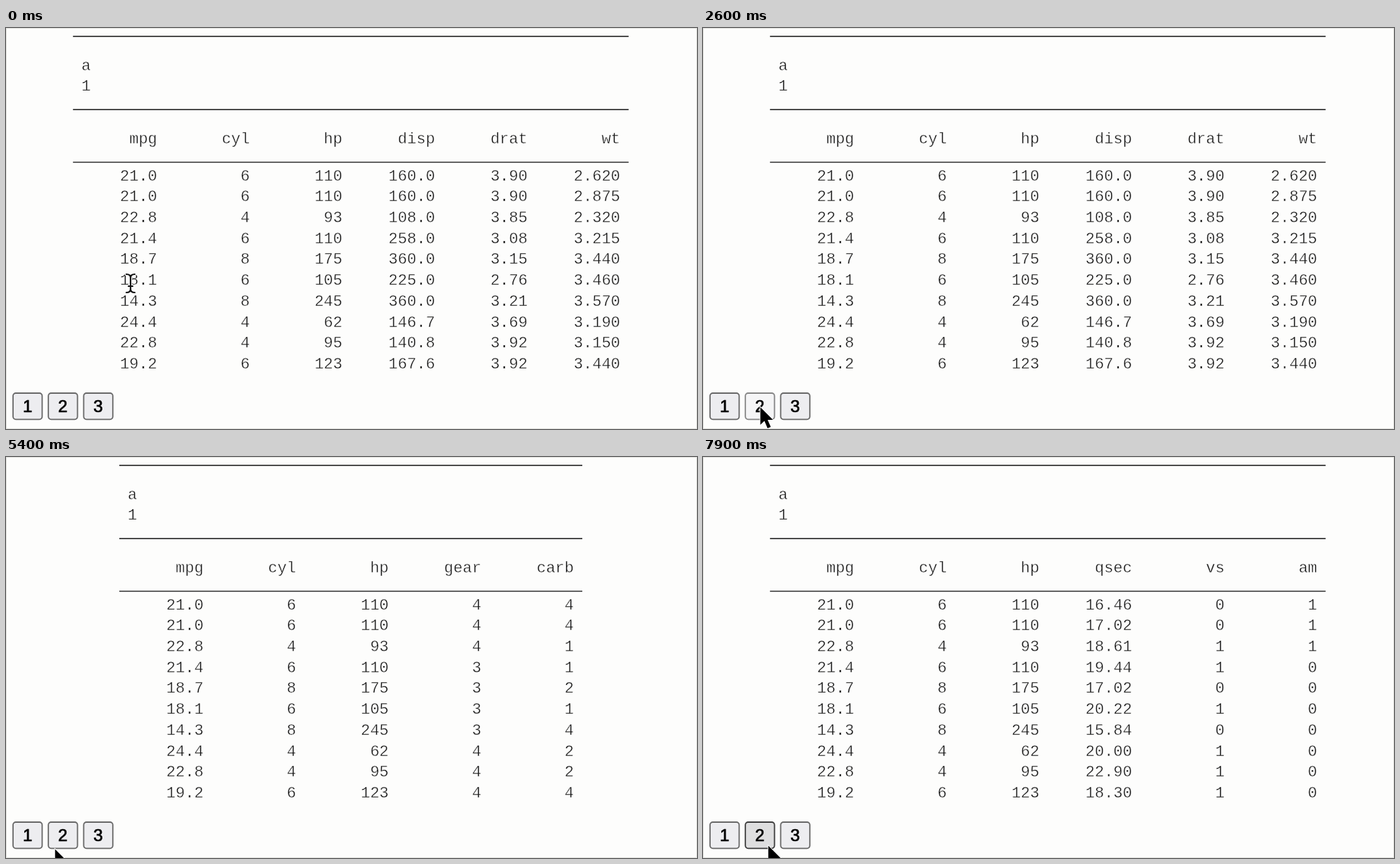
Recreate the animation shown at these times as an HTML page. Size 982x570 px, loop 8000 ms.

```html
<!DOCTYPE html>
<html lang="en">
<head>
<meta charset="utf-8">
<title>Table views</title>
<style>
  html, body { margin: 0; width: 100%; height: 100%; overflow: hidden; background: #fdfdfc; }
  svg { display: block; width: 982px; height: 570px; }
  .cell { font: 22px "Courier New", "Liberation Mono", monospace; fill: #141414; stroke: #fdfdfc; stroke-width: .45; }
  .label { font: 24px Arial, "Liberation Sans", sans-serif; fill: #000; stroke: #000; stroke-width: .7; text-anchor: middle; }
  .rule { stroke: #333; stroke-width: 1.6; }
</style>
</head>
<body>
<svg id="stage" viewBox="0 0 982 570"></svg>
<script>
const LOOP = 8000, STEP = 100;
const COLUMN = 131.6, ROW = 29.73;
const stage = document.getElementById('stage');

// Measured values are text; the classes below follow from them.
const columns = {
  mpg: '21.0 21.0 22.8 21.4 18.7 18.1 14.3 24.4 22.8 19.2',
  hp: '110 110 93 110 175 105 245 62 95 123',
  disp: '160.0 160.0 108.0 258.0 360.0 225.0 360.0 146.7 140.8 167.6',
  drat: '3.90 3.90 3.85 3.08 3.15 2.76 3.21 3.69 3.92 3.92',
  wt: '2.620 2.875 2.320 3.215 3.440 3.460 3.570 3.190 3.150 3.440',
  qsec: '16.46 17.02 18.61 19.44 17.02 20.22 15.84 20.00 22.90 18.30',
  carb: '4 4 1 1 2 1 4 2 2 4'
};
for (const name in columns) columns[name] = columns[name].split(' ');
columns.cyl = columns.hp.map(hp => hp < 100 ? 4 : hp > 150 ? 8 : 6);
columns.vs = columns.qsec.map(qsec => qsec > 18 ? 1 : 0);
columns.am = columns.mpg.map((_, row) => row < 3 ? 1 : 0);
columns.gear = columns.drat.map(drat => drat < 3.5 ? 3 : 4);

const pages = ['disp drat wt', 'qsec vs am', 'gear carb'];

const clicks = [
  { at: 2700, page: 1 }, { at: 4000, page: 2 }, { at: 5800, page: 0 },
  { at: 7400, page: 1 }, { at: 8460, page: 2 }
];
const PRESS = 150, TRAVEL = 600, DIP = 20;

// The pointer leaves the table, then goes from button to button.
const home = { x: 177, y: 363 };
const visits = [
  { at: 750, x: 105, y: 600 },
  ...clicks.map(({ at, page }) => ({ at, x: 34 + 47.5 * page, y: 539 }))
];

function add(parent, tag, attrs, text) {
  const node = document.createElementNS('http://www.w3.org/2000/svg', tag);
  for (const key in attrs) node.setAttribute(key, attrs[key]);
  if (text !== undefined) node.textContent = text;
  parent.append(node);
  return node;
}

function addPage(extra) {
  const names = ['mpg', 'cyl', 'hp', ...extra.split(' ')];
  const group = add(stage, 'g', {});
  const width = names.length * COLUMN;
  const left = 490 - width / 2;
  const write = (x, y, text, anchor) =>
    add(group, 'text', { class: 'cell', x, y, 'text-anchor': anchor }, text);

  for (const y of [11.9, 115.9, 190.7])
    add(group, 'line', { class: 'rule', x1: left, x2: left + width, y1: y, y2: y });
  write(left + 12, 59.5, 'a', 'start');
  write(left + 12, 88.5, '1', 'start');
  names.forEach((name, i) => {
    const right = left + (i + 1) * COLUMN - 12;
    write(right, 163.5, name, 'end');
    columns[name].forEach((value, row) => write(right, 216.5 + row * ROW, value, 'end'));
  });
  return group;
}

function addButton(i) {
  const x = 10 + i * 50.2;
  const box = add(stage, 'rect', { x, y: 519, width: 41.4, height: 37.3, rx: 4, 'stroke-width': 1.8 });
  add(stage, 'text', { class: 'label', x: x + 20.6, y: 545.7 }, i + 1);
  return { x, box };
}

const views = pages.map(addPage);
const buttons = pages.map((_, i) => addButton(i));
add(stage, 'rect', { x: .5, y: .5, width: 981, height: 569, fill: 'none', stroke: '#e2e2de' });

const arrow = add(stage, 'path', {
  d: 'M0 0V25L5.8 19.6L10.3 30L14.8 28L10.4 18H18Z',
  fill: '#000', stroke: '#fff', 'stroke-width': 1.8, 'paint-order': 'stroke'
});
const beam = add(stage, 'g', { fill: 'none', 'stroke-linecap': 'round' });
for (const [stroke, width] of [['#fff', 4.5], ['#111', 2.2]])
  add(beam, 'path', {
    d: 'M-6 -13Q0 -13 0 -8Q0 -13 6 -13M0 -8V8M-6 13Q0 13 0 8Q0 13 6 13M-3 4H3',
    stroke, 'stroke-width': width
  });

// Each trip eases in and out, sagging a little on the way.
function pointerAt(t) {
  let { x, y } = home;
  for (const visit of visits) {
    const u = Math.min(1, (t - visit.at + PRESS + TRAVEL) / TRAVEL);
    if (u <= 0) break;
    const k = u * u * (3 - 2 * u);
    x += (visit.x - x) * k;
    y += (visit.y - y) * k + DIP * Math.sin(Math.PI * k);
  }
  return { x, y };
}

function show(node, visible) {
  node.setAttribute('display', visible ? 'inline' : 'none');
}

function render(t) {
  const last = clicks.filter(click => click.at <= t).pop();
  views.forEach((view, i) => show(view, i === (last ? last.page : 0)));

  const { x, y } = pointerAt(t);
  const pressed = clicks.some(({ at }) => t >= at - PRESS && t < at);
  for (const button of buttons) {
    const over = x >= button.x && x <= button.x + 41 && y >= 518 && y <= 557;
    const [fill, stroke] = !over ? ['#ededf0', '#686868']
      : pressed ? ['#f5f5f6', '#858585'] : ['#dededf', '#3c3c3c'];
    button.box.setAttribute('fill', fill);
    button.box.setAttribute('stroke', stroke);
  }

  const overText = y < 492;
  show(beam, overText);
  show(arrow, !overText);
  (overText ? beam : arrow).setAttribute('transform', `translate(${x} ${y})`);
}

const start = performance.now();
function tick() {
  const t = (performance.now() - start) % LOOP;
  render(Math.floor(t / STEP) * STEP);
  requestAnimationFrame(tick);
}
tick();
</script>
</body>
</html>
```
